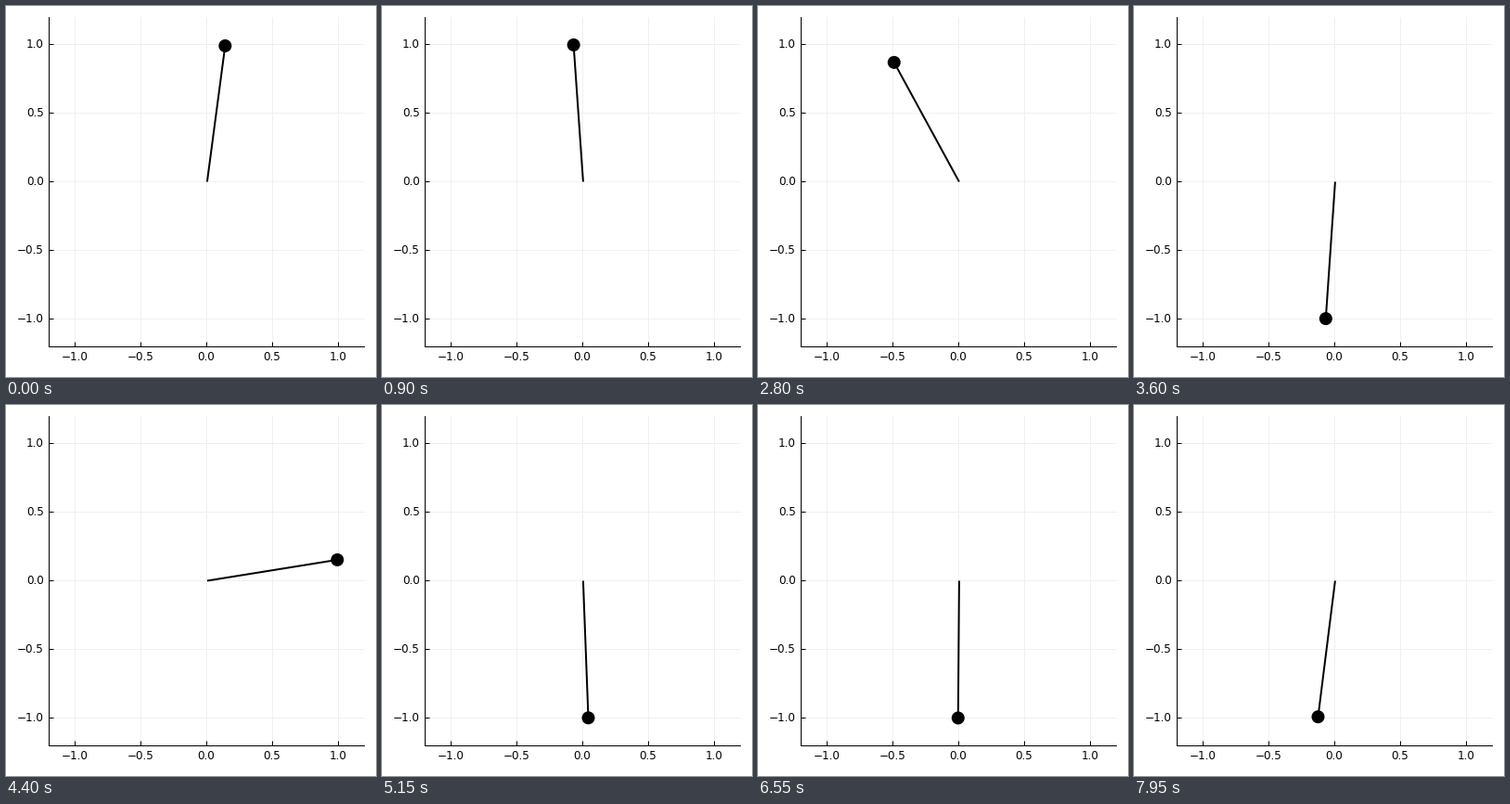
Animation, 399 px wide and 400 px high, one loop 8 s. Source, as a matplotlib script:

```python
import numpy as np
import matplotlib.pyplot as plt
from matplotlib.animation import FuncAnimation
from matplotlib.patches import Circle

W, H, DPI = 399, 400, 100
FRAMES, INTERVAL = 160, 50

# damped pendulum, angle measured counter-clockwise from straight down
GRAVITY, DAMPING, DT = 9.81, 0.5, 0.04
ANCHOR, ANCHOR_STATE = 39, (2.2663, 3.4417)

# plot geometry in pixels, y pointing down
CX, CY = 216.9, 189.5
SX, SY = 142.05, 147.95
LEFT, RIGHT, TOP, BOTTOM = 46.5, 387, 12, 367.5
TICKS = (-1.0, -0.5, 0.0, 0.5, 1.0)


def px(size):
    """Pixels to points."""
    return size * 72 / DPI


def slope(state):
    angle, speed = state
    return np.array([speed, -GRAVITY * np.sin(angle) - DAMPING * speed])


def advance(state, dt, substeps=4):
    h = dt / substeps
    for _ in range(substeps):
        k1 = slope(state)
        k2 = slope(state + h / 2 * k1)
        k3 = slope(state + h / 2 * k2)
        k4 = slope(state + h * k3)
        state = state + h / 6 * (k1 + 2 * k2 + 2 * k3 + k4)
    return state


def swing():
    """Angles for all frames, solved both ways from the anchor state."""
    angles = np.zeros(FRAMES)
    for step, stop in ((-1, -1), (1, FRAMES)):
        state = np.array(ANCHOR_STATE)
        for i in range(ANCHOR, stop, step):
            angles[i] = state[0]
            state = advance(state, step * DT)
    return angles


plt.rcParams["font.family"] = "DejaVu Sans"
fig = plt.figure(figsize=(W / DPI, H / DPI), dpi=DPI, facecolor="white")
ax = fig.add_axes([0, 0, 1, 1])
ax.set_xlim(0, W)
ax.set_ylim(H, 0)
ax.axis("off")


def stroke(xs, ys, color="black", width=1, zorder=2):
    return ax.plot(xs, ys, color=color, lw=px(width), zorder=zorder,
                   solid_capstyle="butt", snap=False)[0]


for value in TICKS:
    x = np.floor(CX + SX * value) + 0.5
    y = np.floor(CY - SY * value) + 0.5
    stroke([x, x], [TOP, BOTTOM], "#f0f0f0", zorder=1)
    stroke([LEFT, RIGHT], [y, y], "#f0f0f0", zorder=1)
    stroke([x, x], [BOTTOM, BOTTOM - 5])
    stroke([LEFT, LEFT + 5], [y, y])
    label = f"{value:.1f}".replace("-", "\u2212")
    ax.text(x - 0.7, 381.8, label, size=px(12), ha="center", va="baseline")
    ax.text(40.7, y + 3.6, label, size=px(12), ha="right", va="baseline")

stroke([LEFT, LEFT], [TOP, BOTTOM + 0.5])
stroke([LEFT - 0.5, RIGHT], [BOTTOM, BOTTOM])

rod = stroke([CX, CX], [CY, CY], width=2, zorder=3)
bob = ax.add_patch(Circle((CX, CY), 7, color="black", lw=0, zorder=4))
angles = swing()


def draw(i):
    x = CX + SX * np.sin(angles[i])
    y = CY + SY * np.cos(angles[i])
    rod.set_data([CX, x], [CY, y])
    bob.center = (x, y)
    return rod, bob


anim = FuncAnimation(fig, draw, frames=FRAMES, interval=INTERVAL,
                     repeat=True, repeat_delay=0)
plt.show()
```
